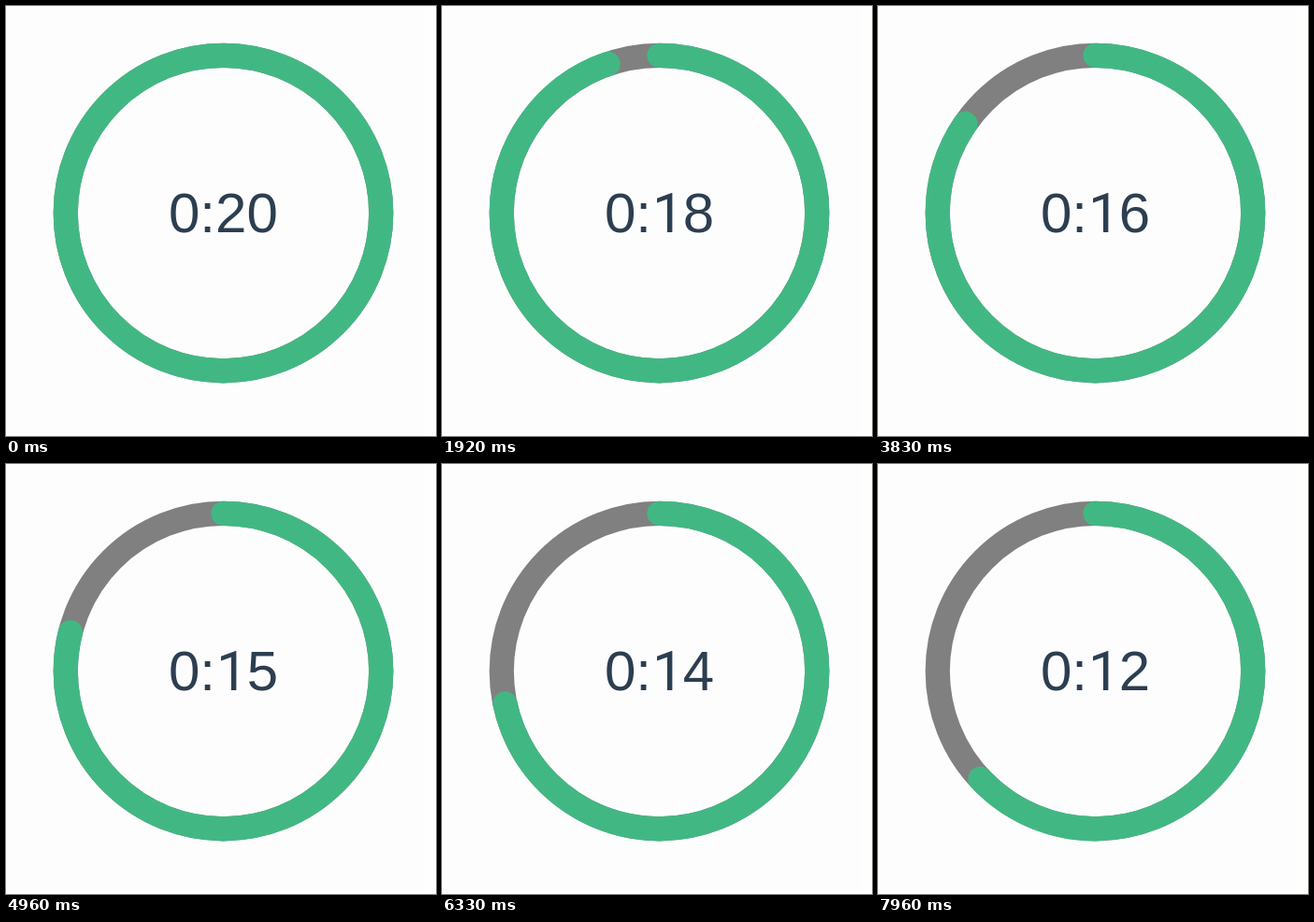
These frames come from a looping animation (460 px wide and 460 px high, 8000 ms). An HTML page without scripts:

```html
<!DOCTYPE html>
<html lang="en">
<head>
<meta charset="utf-8">
<title>Countdown ring</title>
<style>
  html, body {
    margin: 0;
    width: 100%;
    height: 100%;
    overflow: hidden;
    background: #fdfdfe;
  }

  .stage {
    display: block;
    width: 100vw;
    height: 100vh;
  }

  .margin { fill: #fefefc; }

  .track, .left {
    fill: none;
    stroke-width: 7;
  }

  .track { stroke: #808080; }

  .left {
    stroke: #41b883;
    stroke-linecap: round;
    stroke-dasharray: 283 283;
    animation: drain 8s linear infinite;
  }

  .reel {
    font: 60px "Liberation Sans", Arial, sans-serif;
    fill: #2c3e50;
    animation: count 8s step-end infinite;
  }

  /* A "1" without a foot */
  .one { font-family: Roboto, sans-serif; }

  /* One-second linear steps, each starting just after its tick */
  @keyframes drain {
    0%, 11.25% { stroke-dasharray: 283 283; }
    23.75% { stroke-dasharray: 268 283; }
    36.25% { stroke-dasharray: 253 283; }
    48.75% { stroke-dasharray: 238 283; }
    61.25% { stroke-dasharray: 224 283; }
    73.75% { stroke-dasharray: 209 283; }
    86.25% { stroke-dasharray: 194 283; }
    98.75% { stroke-dasharray: 179 283; }
    100% { stroke-dasharray: 177.5 283; }
  }

  @keyframes count {
    0% { transform: translateY(0); }
    10.25% { transform: translateY(-80px); }
    22.75% { transform: translateY(-160px); }
    35.25% { transform: translateY(-240px); }
    47.75% { transform: translateY(-320px); }
    60.25% { transform: translateY(-400px); }
    72.75% { transform: translateY(-480px); }
    85.25% { transform: translateY(-560px); }
    97.75%, 100% { transform: translateY(-640px); }
  }
</style>
</head>
<body>
<svg class="stage" viewBox="0 0 460 460">
  <rect class="margin" x="448" width="12" height="460"/>

  <g transform="translate(232.5 221.5) rotate(-90) scale(3.75)">
    <circle class="track" r="45"/>
    <circle class="left" r="45"/>
  </g>

  <!-- Window onto the column of times -->
  <svg x="152" y="182" width="160" height="80" overflow="hidden">
    <g class="reel">
      <text x="22" y="60">0:20</text>
      <text x="22" y="140">0:<tspan class="one" dx="1">1</tspan><tspan dx="-1">9</tspan></text>
      <text x="22" y="220">0:<tspan class="one" dx="1">1</tspan><tspan dx="-1">8</tspan></text>
      <text x="22" y="300">0:<tspan class="one" dx="1">1</tspan><tspan dx="-1">7</tspan></text>
      <text x="22" y="380">0:<tspan class="one" dx="1">1</tspan><tspan dx="-1">6</tspan></text>
      <text x="22" y="460">0:<tspan class="one" dx="1">1</tspan><tspan dx="-1">5</tspan></text>
      <text x="22" y="540">0:<tspan class="one" dx="1">1</tspan><tspan dx="-1">4</tspan></text>
      <text x="22" y="620">0:<tspan class="one" dx="1">1</tspan><tspan dx="-1">3</tspan></text>
      <text x="22" y="700">0:<tspan class="one" dx="1">1</tspan><tspan dx="-1">2</tspan></text>
    </g>
  </svg>
</svg>
</body>
</html>
```
